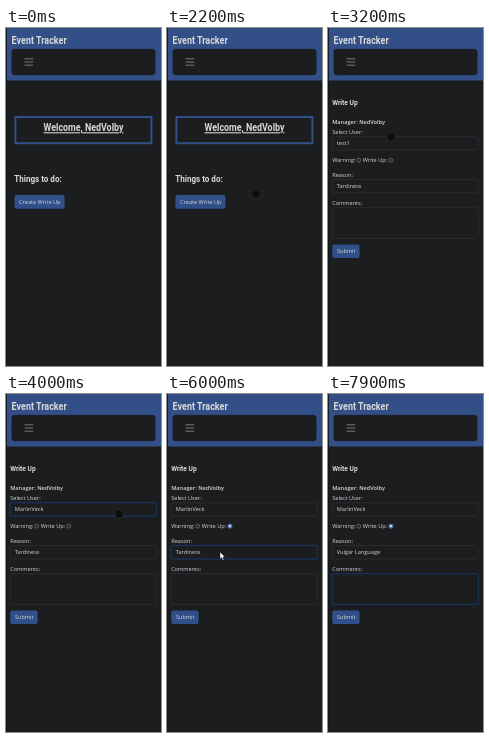
An HTML page that plays this animation: 155x338 px, repeating every 8000 ms.

```html
<!DOCTYPE html>
<html lang="en">
<head>
<meta charset="utf-8">
<title>Event Tracker</title>
<style>
  html, body { margin: 0; width: 100%; height: 100%; overflow: hidden; background: #1b1d1f; }
  svg { display: block; width: 100%; height: 100%; }
  text { font: 5.6px "Open Sans", "Noto Sans", sans-serif; fill: #d6d8da; }
  .semi { font-weight: 600; }
  .head { font-family: Roboto, sans-serif; font-weight: 700; fill: #dad9d6; }
  .field { fill: #1b1d1f; stroke: #34383c; stroke-width: .6; }
  .glow { fill: none; stroke: #15253f; stroke-width: 1.4; opacity: 0; }
  .focus .glow { opacity: 1; }
  .focus .field { stroke: #1f427b; }
  .button { fill: #314f89; }
  .radio { fill: #26292b; stroke: #75787b; stroke-width: .7; }
</style>
</head>
<body>
<svg viewBox="0 0 155 338">
  <rect width="155" height="338" fill="#1b1d1f"/>
  <rect width="155" height="52.5" fill="#334f88"/>
  <rect x="6" y="21.3" width="143" height="25.5" rx="2.5" fill="#1b1d1f" stroke="#171b24" stroke-width=".8"/>
  <path d="M18.6 30.8h8.6m-8.6 3.2h8.6m-8.6 3.2h8.6" stroke="#8d9093" stroke-width=".8"/>
  <g id="title"></g>
  <g id="home"></g>
  <g id="form"></g>
  <rect width=".9" height="338" fill="#15171a"/>
  <circle id="touch" r="4.4" fill="#0c0d0f" stroke="#303336" stroke-width=".7"/>
  <path id="arrow" d="M0 0v7l1.6-1.5 1.1 2.6 1.2-.5-1.1-2.5h2.2z" fill="#fff" stroke="#0a0a0a" stroke-width=".4"/>
</svg>
<script>
const LOOP = 8000, STEP = 100, SPEED = 0.2, LEFT = 4.2;
const el = id => document.getElementById(id);

const label = (text, x, y, attrs = "") => `<text x="${x}" y="${y}" ${attrs}>${text}</text>`;

// Headings share one condensed face
const heading = (text, x, y, size, attrs = "") =>
  `<text class="head" transform="translate(${x} ${y}) scale(.84 1)" style="font-size:${size}px" ${attrs}>${text}</text>`;

const box = (kind, x, y, w, h) =>
  `<rect class="${kind}" x="${x}" y="${y}" width="${w}" height="${h}" rx="2"/>`;

const button = (text, x, y, w) =>
  box("button", x, y, w, 13.7) + label(text, x + 4.7, y + 8.8);

const radio = x => `<circle class="radio" cx="${x}" cy="132.2" r="2"/>`;

// A labelled input whose outline glows on focus
const field = (id, name, y, h) =>
  label(name, LEFT, y - 2.4) +
  `<g id="${id}">` +
  box("glow", LEFT - .4, y - .4, 147, h + .8) +
  box("field", LEFT, y, 146.2, h) +
  label("", 8.8, y + 8.6) + "</g>";

el("title").innerHTML = heading("Event Tracker", 5.6, 16, 10.7);

el("home").innerHTML =
  '<rect x="9.4" y="89" width="136" height="26.2" fill="none" stroke="#314f89" stroke-width="2"/>' +
  heading("Welcome, NedVolby", 77.5, 103.2, 10.6, 'text-anchor="middle" text-decoration="underline"') +
  heading("Things to do:", 8.3, 154, 9.6) +
  button("Create Write Up", 8.4, 167, 50.2);

el("form").innerHTML =
  heading("Write Up", LEFT, 77, 7.9) +
  label("Manager: NedVolby", LEFT, 96, 'class="semi"') +
  field("user", "Select User:", 108.8, 13.3) +
  label("Warning:", LEFT, 134.2) + radio(30.7) +
  label("Write Up:", 34.8, 134.2) + radio(62.9) +
  '<g id="picked" transform="translate(62.9 132.2)"><circle r="2.4" fill="#4a6fb5"/><circle r="1.1" fill="#dfe4ee"/></g>' +
  field("reason", "Reason:", 151.6, 13.3) +
  field("comments", "Comments:", 179.8, 30.6) +
  '<path id="caret" d="M9 183.5v7" stroke="#d5d7d9" stroke-width=".6"/>' +
  button("Submit", LEFT, 216.4, 27.4);

// Pointer stops; each is reached at the given time
const stops = [
  { at: 100, x: 109, y: 150 },
  { at: 900, x: 27, y: 19 },    // menu
  { at: 1800, x: 44, y: 172 },  // create button
  { at: 2200, x: 89, y: 166 },
  { at: 2700, x: 63, y: 109 },  // user list
  { at: 4000, x: 113, y: 120 },
  { at: 5200, x: 63, y: 133 },  // write-up radio
  { at: 5800, x: 53, y: 158 },  // reason list
  { at: 6500, x: 42, y: 101 },
  { at: 7200, x: 60, y: 185 }   // comments
];

const between = (t, a, b) => t >= a && t < b;
const show = (id, on) => el(id).setAttribute("visibility", on ? "inherit" : "hidden");
const focus = (id, on) => el(id).classList.toggle("focus", on);
const setValue = (id, value) => { el(id).querySelector("g > text").textContent = value; };

// Rest at each stop, then leave just in time for the next one
function pointerAt(t) {
  const i = stops.findIndex(s => s.at > t);
  const to = stops.at(i), from = stops[Math.max(i - 1, 0)];
  if (i < 1) return [to.x, to.y];
  const dx = to.x - from.x, dy = to.y - from.y;
  const travel = Math.min(Math.hypot(dx, dy) / SPEED, to.at - from.at);
  const k = Math.max(0, 1 - (to.at - t) / travel);
  return [from.x + dx * k, from.y + dy * k];
}

function draw(t) {
  const onForm = t >= 2400;
  show("home", !onForm);
  show("form", onForm);
  setValue("user", t < 3600 ? "test1" : "MarlinVeck");
  setValue("reason", t < 7000 ? "Tardiness" : "Vulgar Language");
  focus("user", between(t, 3300, 5400));
  focus("reason", between(t, 5800, 7400));
  focus("comments", t >= 7400);
  show("picked", t >= 5300);
  show("caret", between(t, 7400, 7900));

  const listOpen = between(t, 3400, 3800) || between(t, 5800, 6900);
  const active = between(t, 100, 7500);
  const at = `translate(${pointerAt(t)})`;
  el("touch").setAttribute("transform", at);
  el("arrow").setAttribute("transform", at);
  show("touch", active && !listOpen);
  show("arrow", active && listOpen);
}

const start = performance.now();
function tick() {
  const t = (performance.now() - start) % LOOP;
  draw(Math.floor(t / STEP) * STEP);
  requestAnimationFrame(tick);
}
tick();
</script>
</body>
</html>
```
